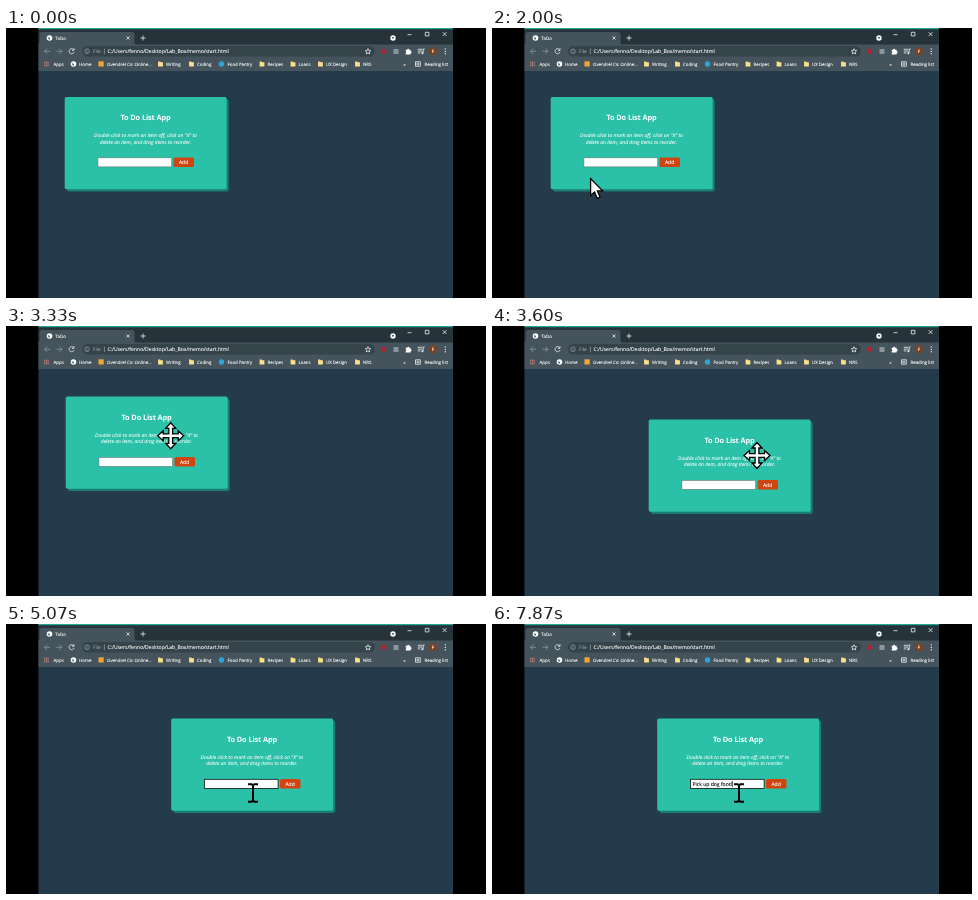
Recreate the animation shown at these times as an HTML page. Size 480 px wide and 270 px high, loop 8000 ms.

```html
<!DOCTYPE html>
<html lang="en">
<head>
<meta charset="utf-8">
<title>ToDo</title>
<style>
  html, body { margin: 0; width: 100%; height: 100%; overflow: hidden; background: #000; }
  svg { display: block; width: 480px; height: 270px; }
  text { font-family: "Open Sans", "Noto Sans", sans-serif; text-rendering: geometricPrecision; white-space: pre; }
  .bar text { font-size: 4.4px; fill: #fff; stroke: #fff; stroke-width: .1; }
  .bar .muted { fill: #adb7bc; stroke: none; }
  .line { fill: none; stroke: #eef1f3; stroke-width: .8; }
  .dim { stroke: #97a4aa; stroke-width: .7; }
  .mid { text-anchor: middle; fill: #fff; }
</style>
</head>
<body>
<svg viewBox="0 0 480 270">
  <defs>
    <g id="globe">
      <circle r="2.8" fill="#fff"/>
      <path d="M-2-.8L-.2-.6.6.8-.4 2Z" fill="#56656c"/>
    </g>
    <path id="folder" d="M-2.4-2.4h2l.6.7h2.2v4.1h-4.8z" fill="#fbe08a"/>
  </defs>

  <!-- window -->
  <rect x="32.5" width="414.5" height="270" fill="#243b4b"/>
  <rect x="32.5" width="414.5" height="17" fill="#26333a"/>
  <rect x="32.5" width="414.5" height="1.2" fill="#24a594"/>
  <path d="M31 17Q33.500 17 33.500 14V6.500Q33.500 4 36 4H126Q128.500 4 128.500 6.500V14Q128.500 17 131 17Z" fill="#45545c"/>
  <rect x="32.5" y="16.500" width="414.5" height="26.500" fill="#45545c"/>
  <rect x="76" y="18" width="293" height="10.500" rx="5.200" fill="#35434b"/>

  <g class="bar" id="bar">
    <use href="#globe" x="43.500" y="10"/>
    <text x="49.300" y="11.800">ToDo</text>
    <path class="line" d="M120.500 8.500l3 3m0-3l-3 3M134.500 10h5M137 7.500v5"/>
    <circle cx="387" cy="10" r="2.700" fill="#fff"/>
    <path d="M385.600 9.300h2.800l-1.400 1.700z" fill="#26333a"/>
    <path class="line" d="M401.500 6.700h4M419.300 4.300h3.600v3.600h-3.600zM436.700 4.200l3.800 3.800m0-3.800l-3.800 3.800"/>

    <path class="line dim" d="M44 23.300h-5.400m2.500-2.600l-2.600 2.600 2.600 2.600M50.500 23.300h5.400m-2.500-2.600l2.600 2.600-2.600 2.600"/>
    <path class="line" d="M67.600 21.700A2.500 2.500 0 1 0 68 24M68 20.300v2h-2"/>
    <circle class="line dim" cx="81" cy="23.300" r="2.300"/>
    <path class="line dim" d="M81 22.900v1.600m0-2.700v.5"/>
    <text class="muted" x="87" y="25.200" style="font-size:4.900px">File</text>
    <path class="line dim" d="M98.400 20.500v5.600"/>
    <text x="101.500" y="25.200" style="font-size:5.100px">C:/Users/fenno/Desktop/Lab_Box/memo/start.html</text>
    <path class="line" d="M362 20.700l.8 1.800 1.900.2-1.400 1.300.4 1.900-1.700-1-1.700 1 .4-1.900-1.400-1.300 1.900-.2z" stroke-width=".6"/>
    <rect x="375.500" y="21" width="4.500" height="4.500" fill="#b3202f"/>
    <rect x="387.500" y="21" width="5" height="5" fill="#8a959b"/>
    <path d="M399.700 21.700h1.500a1 1 0 0 1 2 0h1.400v1.500a1 1 0 0 1 0 2v1.300h-4.900v-1.500a.9.900 0 0 0 0-1.700z" fill="#fff"/>
    <path class="line" d="M411.800 21.300h4.600M411.800 23.100h4.600M411.800 24.900h2.600M417.200 25v-4h1.500"/>
    <circle cx="416.400" cy="25.200" r="1" fill="#eef1f3"/>
    <circle cx="426.800" cy="23.300" r="4" fill="#7d421f"/>
    <text class="mid" x="426.800" y="25">F</text>
    <path d="M439.300 20.900v.1m0 2.300v.1m0 2.300v.1" stroke="#fff" stroke-width="1.200" stroke-linecap="round"/>

    <path d="M38.200 34.200h4.500M38.200 36h4.500M38.200 37.800h4.500" stroke="#d98a80" stroke-width="1.100" stroke-dasharray="1.100 .6"/>
    <use href="#globe" x="67.500" y="36"/>
    <rect x="92.500" y="33.300" width="5.200" height="5.200" fill="#f0a535"/>
    <circle cx="215.500" cy="36" r="2.700" fill="#2aa5dc"/>
    <path class="line" d="M409.500 33.800h4.800v4.400h-4.800zM410.600 35.300h2.600M410.600 36.700h2.600"/>
  </g>

  <!-- app card -->
  <g id="card">
    <rect x="61" y="71.200" width="161.700" height="92.200" rx="1.800" fill="#1a7d75"/>
    <rect x="58.700" y="69" width="162" height="92.300" rx="1.800" fill="#2bc0a8"/>
    <text class="mid" x="139.500" y="92.200" font-size="7.400" font-weight="700" letter-spacing="-.12">To Do List App</text>
    <g font-size="5" font-style="italic" stroke="#fff" stroke-width=".08">
      <text class="mid" x="139.500" y="109.400">Double click to mark an item off, click on "X" to</text>
      <text class="mid" x="139.500" y="115.800">delete an item, and drag items to reorder.</text>
    </g>
    <rect id="field" x="91.900" y="129.800" width="73.700" height="9.100" fill="#fff"/>
    <text id="typed" x="94" y="136.200" font-size="5.050" fill="#000" stroke="#000" stroke-width=".1"></text>
    <rect id="caret" y="131.400" width=".6" height="6.300" fill="#000"/>
    <rect x="167.500" y="129.500" width="20.500" height="9.500" rx="1.500" fill="#d0450f"/>
    <text class="mid" x="177.600" y="136.200" font-size="5" stroke="#fff" stroke-width=".1">Add</text>
  </g>

  <!-- pointers, hot spot at 0,0 -->
  <g id="arrow">
    <path d="M.6.6V17.600L4.500 14 7.200 20.300 10 19.100 7.400 12.900H12.600Z" fill="#fff" stroke="#000" stroke-width="1.300"/>
  </g>
  <g id="move">
    <path d="M0-13L5-7.500H1.900V-1.900H7.500V-5L13 0 7.500 5V1.900H1.900V7.500H5L0 13-5 7.500H-1.900V1.900H-7.500V5L-13 0-7.500-5V-1.900H-1.900V-7.500H-5Z" fill="#fff" stroke="#000" stroke-width="1.300"/>
  </g>
  <g id="beam">
    <path d="M-5-8.700H-1.500L0-7.800 1.500-8.700H5M-5 8.700H-1.500L0 7.800 1.500 8.700H5M0-8V8" fill="none" stroke="#000" stroke-width="2"/>
  </g>
</svg>
<script>
const $ = id => document.getElementById(id);
const NS = 'http://www.w3.org/2000/svg';

function add(tag, attrs, text = '') {
  const el = document.createElementNS(NS, tag);
  for (const k in attrs) el.setAttribute(k, attrs[k]);
  el.textContent = text;
  $('bar').append(el);
}

// label, x, has folder icon
[['Apps', 47.5], ['Home', 73], ['Ovendrel Co: Online...', 101], ['Writing', 160, 1],
 ['Coding', 191, 1], ['Food Pantry', 221.5], ['Recipes', 261.5, 1], ['Loans', 292.5, 1],
 ['UX Design', 320, 1], ['NRS', 357, 1], ['»', 397.5], ['Reading list', 418.5]
].forEach(([label, x, folder]) => {
  add('text', { x, y: 37.6 }, label);
  if (folder) add('use', { href: '#folder', x: x - 5.5, y: 36 });
});

// time, x, y
const cardPath = [[3267, 0, 0], [3333, 1, 1.5], [3600, 98, 24.5], [3733, 106.5, 25.5]];
const pointerPath = [
  [1467, 207, 200], [2000, 98, 150], [2133, 92, 150], [2333, 92, 150],
  [2800, 171, 101], [3000, 164, 109], [3267, 164, 109], [3333, 164.7, 109.8],
  [3600, 265, 129.5], [3733, 272, 131], [3800, 272, 131], [4333, 247, 169]
];

const text = 'Pick up dog food';
const keyTimes = [5270, 5400, 5600, 5800, 6130, 6270, 6400, 6470,
                  6670, 6800, 6930, 7070, 7400, 7530, 7730, 7870];
const FOCUS = 4530, BLINK = 530;

function along(path, t) {
  const i = path.findIndex(p => p[0] > t);
  if (i < 0) return path[path.length - 1].slice(1);
  if (i === 0) return path[0].slice(1);
  const [t0, x0, y0] = path[i - 1], [t1, x1, y1] = path[i];
  const p = (t - t0) / (t1 - t0), e = p * p * (3 - 2 * p);
  return [x0 + (x1 - x0) * e, y0 + (y1 - y0) * e];
}

const place = (id, [x, y]) => $(id).setAttribute('transform', `translate(${x} ${y})`);
const show = (id, on) => $(id).setAttribute('visibility', on ? 'visible' : 'hidden');

function draw(t) {
  const step = Math.floor(t * .015 + .1) / .015;
  place('card', along(cardPath, step));

  const pos = along(pointerPath, step);
  const kind = t < 795 ? '' : t < 2520 ? 'arrow' : t < 4060 ? 'move' : t < 4195 ? 'arrow' : 'beam';
  for (const id of ['arrow', 'move', 'beam']) {
    show(id, id === kind);
    place(id, pos);
  }

  const focused = t >= FOCUS;
  $('field').setAttribute('stroke', focused ? '#111' : '#5d7775');
  $('field').setAttribute('stroke-width', focused ? .8 : .6);

  const count = keyTimes.filter(k => k <= t).length;
  $('typed').textContent = text.slice(0, count);
  const since = t - (count ? keyTimes[count - 1] : FOCUS);
  show('caret', focused && since % (2 * BLINK) < BLINK);
  $('caret').setAttribute('x', 94.2 + $('typed').getComputedTextLength());
}

function frame() {
  draw(performance.now() % 8000);
  requestAnimationFrame(frame);
}
frame();
</script>
</body>
</html>
```
